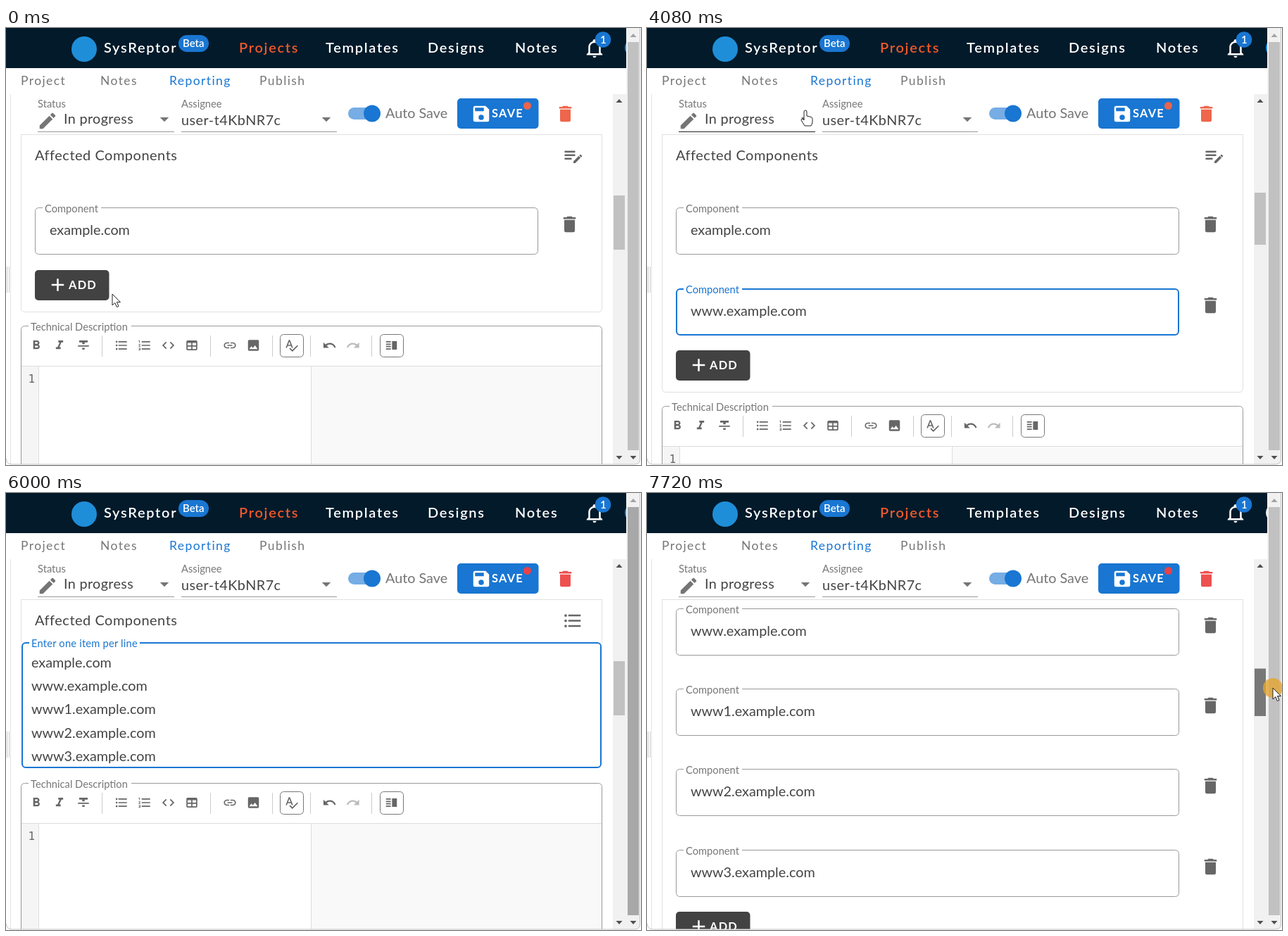
An HTML page that plays this animation: 902x621 px, repeating every 8000 ms.

```html
<!DOCTYPE html>
<html lang="en">
<head>
<meta charset="utf-8">
<title>Affected components</title>
<style>
html, body { margin: 0; width: 100%; height: 100%; overflow: hidden; background: #fff; }
svg { display: block; }
text { font-family: Lato, "Open Sans", sans-serif; white-space: pre; }
.body { font-size: 19.8px; fill: #444; }
.small { font-size: 14.7px; fill: #777; }
.title { font-size: 20px; letter-spacing: .5px; fill: #444; }
.tab { font-size: 17.5px; letter-spacing: 1.4px; fill: #777; }
.nav { font-size: 20px; font-weight: 600; letter-spacing: 1.7px; fill: #fff; }
.btn { font-size: 16.4px; font-weight: 700; letter-spacing: 1.25px; fill: #fff; }
.badge { font-size: 15px; font-weight: 600; fill: #fff; }
.num { font: 16px "DejaVu Sans Mono", monospace; fill: #666; }
.todo { font-size: 17.3px; fill: #fff; }
</style>
</head>
<body>
<svg id="stage" width="902" height="621" viewBox="0 0 902 621">
  <defs>
    <clipPath id="pane"><rect x="7" y="152" width="855" height="468"/></clipPath>
    <clipPath id="bar"><rect width="881" height="57"/></clipPath>
  </defs>
  <g id="content" clip-path="url(#pane)"></g>
  <g id="chrome"></g>
  <g id="live"></g>
</svg>
<script>
const BLUE = '#1976d2', GREY = '#999', LOOP = 8000, PITCH = 114.33;
const $ = id => document.getElementById(id);

const ICONS = {
  pencil: 'M20.71,7.04C21.1,6.65 21.1,6 20.71,5.63L18.37,3.29C18,2.9 17.35,2.9 16.96,3.29L15.12,5.12L18.87,8.87M3,17.25V21H6.75L17.81,9.93L14.06,6.18L3,17.25Z',
  down: 'M7,10L12,15L17,10H7Z',
  save: 'M15,9H5V5H15M12,19A3,3 0 0,1 9,16A3,3 0 0,1 12,13A3,3 0 0,1 15,16A3,3 0 0,1 12,19M17,3H5C3.89,3 3,3.9 3,5V19A2,2 0 0,0 5,21H19A2,2 0 0,0 21,19V7L17,3Z',
  trash: 'M19,4H15.5L14.5,3H9.5L8.5,4H5V6H19M6,19A2,2 0 0,0 8,21H16A2,2 0 0,0 18,19V7H6V19Z',
  bell: 'M10 21H14C14 22.1 13.1 23 12 23S10 22.1 10 21M21 19V20H3V19L5 17V11C5 7.9 7 5.2 10 4.3V4C10 2.9 10.9 2 12 2S14 2.9 14 4V4.3C17 5.2 19 7.9 19 11V17L21 19M17 11C17 8.2 14.8 6 12 6S7 8.2 7 11V18H17V11Z',
  plus: 'M19,13H13V19H11V13H5V11H11V5H13V11H19V13Z',
  edit: 'M2,6V8H14V6H2M2,10V12H14V10H2M20.04,10.13C19.9,10.13 19.76,10.19 19.65,10.3L18.65,11.3L20.7,13.35L21.7,12.35C21.92,12.14 21.92,11.79 21.7,11.58L20.42,10.3C20.31,10.19 20.18,10.13 20.04,10.13M18.07,11.88L12,17.94V20H14.06L20.12,13.93L18.07,11.88M2,14V16H10V14H2Z',
  list: 'M7,5H21V7H7V5M7,13V11H21V13H7M7,19V17H21V19H7' + [6, 12, 18].map(y => `M2.5,${y}a1.5,1.5 0 1,1 3,0a1.5,1.5 0 1,1 -3,0`).join(''),
  bold: 'M13.5,15.5H10V12.5H13.5A1.5,1.5 0 0,1 15,14A1.5,1.5 0 0,1 13.5,15.5M10,6.5H13A1.5,1.5 0 0,1 14.5,8A1.5,1.5 0 0,1 13,9.5H10M15.6,10.79C16.57,10.11 17.25,9 17.25,8C17.25,5.74 15.5,4 13.25,4H7V18H14.04C16.14,18 17.75,16.3 17.75,14.21C17.75,12.69 16.89,11.39 15.6,10.79Z',
  italic: 'M10,4V7H12.21L8.79,15H6V18H14V15H11.79L15.21,7H18V4H10Z',
  strike: 'M3,14H21V12H3M5,4V7H10V10H14V7H19V4M10,19H14V16H10V19Z',
  numbers: 'M7,13V11H21V13H7M7,19V17H21V19H7M7,7V5H21V7H7M3,8V5H2V4H4V8H3M2,17V16H5V20H2V19H4V18.5H3V17.5H4V17H2M4.25,10A0.75,0.75 0 0,1 5,10.75C5,10.95 4.92,11.14 4.79,11.27L3.12,13H5V14H2V13.08L4,11H2V10H4.25Z',
  code: 'M14.6,16.6L19.2,12L14.6,7.4L16,6L22,12L16,18L14.6,16.6M9.4,16.6L4.8,12L9.4,7.4L8,6L2,12L8,18L9.4,16.6Z',
  table: 'M5,4H19A2,2 0 0,1 21,6V18A2,2 0 0,1 19,20H5A2,2 0 0,1 3,18V6A2,2 0 0,1 5,4M5,8V12H11V8H5M13,8V12H19V8H13M5,14V18H11V14H5M13,14V18H19V14H13Z',
  link: 'M3.9,12C3.9,10.29 5.29,8.9 7,8.9H11V7H7A5,5 0 0,0 2,12A5,5 0 0,0 7,17H11V15.1H7C5.29,15.1 3.9,13.71 3.9,12M8,13H16V11H8V13M17,7H13V8.9H17C18.71,8.9 20.1,10.29 20.1,12C20.1,13.71 18.71,15.1 17,15.1H13V17H17A5,5 0 0,0 22,12A5,5 0 0,0 17,7Z',
  image: 'M8.5,13.5L11,16.5L14.5,12L19,18H5M21,19V5C21,3.89 20.1,3 19,3H5A2,2 0 0,0 3,5V19A2,2 0 0,0 5,21H19A2,2 0 0,0 21,19Z',
  spell: 'M21.59,11.59L13.5,19.68L9.83,16L8.42,17.41L13.5,22.5L23,13M6.43,11L8.5,5.5L10.57,11M12.45,16H14.54L9.43,3H7.57L2.46,16H4.55L5.67,13H11.31L12.45,16Z',
  undo: 'M12.5,8C9.85,8 7.45,9 5.6,10.6L2,7V16H11L7.38,12.38C8.77,11.22 10.54,10.5 12.5,10.5C16.04,10.5 19.05,12.81 20.1,16L22.47,15.22C21.08,11.03 17.15,8 12.5,8Z',
  redo: 'M11.5,8C14.15,8 16.55,9 18.4,10.6L22,7V16H13L16.62,12.38C15.23,11.22 13.46,10.5 11.5,10.5C7.96,10.5 4.95,12.81 3.9,16L1.53,15.22C2.92,11.03 6.85,8 11.5,8Z',
  split: 'M3 5H11V7H3ZM3 9H11V11H3ZM3 13H11V15H3ZM3 17H11V19H3ZM13 5H21V19H13Z'
};

// Drawing helpers
const icon = (name, cx, cy, fill = '#666', s = 1.25) =>
  `<path d="${ICONS[name]}" fill="${fill}" transform="translate(${cx - 12 * s} ${cy - 12 * s}) scale(${s})"/>`;
const text = (s, x, y, cls, fill) =>
  `<text x="${x}" y="${y}" class="${cls}"${fill ? ` style="fill:${fill}"` : ''}>${s}</text>`;
const rect = (x, y, w, h, fill, r = 0, extra = '') =>
  `<rect x="${x}" y="${y}" width="${w}" height="${h}" rx="${r}" fill="${fill}" ${extra}/>`;
const circle = (x, y, r, fill, extra = '') => `<circle cx="${x}" cy="${y}" r="${r}" fill="${fill}" ${extra}/>`;
const line = (d, stroke, w = 1) => `<path d="${d}" fill="none" stroke="${stroke}" stroke-width="${w}"/>`;

// Rounded border inside the box, with a gap in its top edge for the label
function notched(x, y, w, h, from, to, stroke, sw = 1) {
  const i = sw / 2, side = h - sw - 10;
  return line(`M${to} ${y + i}H${x + w - i - 5}a5 5 0 0 1 5 5v${side}a5 5 0 0 1-5 5H${x + i + 5}` +
    `a5 5 0 0 1-5-5v${-side}a5 5 0 0 1 5-5H${from}`, stroke, sw);
}

// Timing helpers
const pick = (steps, t) => steps.reduce((v, [at, next]) => t >= at ? next : v, steps[0][1]);
const within = (spans, t) => spans.some(([a, b]) => t >= a && t < b);
const ease = k => k * k * (3 - 2 * k);
function along(points, t) {
  const i = points.findIndex(p => p[0] > t);
  if (i < 0) return points[points.length - 1].slice(1);
  const a = points[i - 1], b = points[i], k = ease((t - a[0]) / (b[0] - a[0]));
  return a.slice(1).map((v, j) => v + (b[j + 1] - v) * k);
}

const MOUSE = [
  [0, 151, 378], [140, 151, 378], [420, 112, 370], [1240, 112, 374], [1600, 223, 404],
  [1800, 222, 410], [3720, 222, 410], [3920, 225, 117], [4160, 225, 117], [4560, 805, 182],
  [4720, 805, 182], [4960, 272, 315], [5860, 272, 315], [5980, 910, 250], [6100, 910, 250],
  [6400, 805, 182], [6600, 805, 182], [6880, 897, 252], [7040, 897, 252], [7160, 873, 252],
  [7240, 873, 252], [7700, 889, 277]
];
const POINTER = [
  [0, 'arrow'], [300, 'hand'], [780, 'beam'], [3020, ''], [3720, 'beam'], [3800, 'arrow'],
  [3880, 'hand'], [4240, 'arrow'], [4480, 'hand'], [4720, 'arrow'], [4840, 'beam'], [5300, ''],
  [5860, 'arrow'], [6360, 'hand'], [6640, 'arrow']
];
const CLICKS = [[560, 780], [1440, 1560], [1820, 2360], [4580, 4720], [5040, 5180], [6440, 6580], [7200, LOOP]];
const VIEW = [[0, 'one'], [780, 'two'], [4680, 'lines'], [6520, 'five']];
const SCROLL = [[0, 0], [7240, 0], [7700, 1]];
const HOSTS = ['', 'www.', 'www1.', 'www2.', 'www3.'].map(p => p + 'example.com');

function field(i, value, color, sw = 1) {
  const y = Math.round(255.3 + i * PITCH);
  return notched(41, y, 715, 67, 52, 135, color, sw) +
    text('Component', 55, y + 7, 'small', sw > 1 ? color : '') +
    value(y) + icon('trash', 800.5, y + 24);
}
const plain = s => y => text(s, 62, y + 39, 'body');
const todo = selected => y =>
  (selected ? rect(62, y + 19, 240, 27, '#d7d4f0') : '') +
  rect(62, y + 20, 57, 25, '#e53027', 3) + text('TODO', 66, y + 39, 'todo') +
  text('affected component', 124, y + 39, 'body');

function secondField(t) {
  if (t >= 5000) return field(1, plain(HOSTS[1]), GREY);
  const typed = Math.floor((t - 3020) / 45) + 1;
  const value = t < 3020 ? todo(t >= 2100) : plain(HOSTS[1].slice(0, typed));
  const color = pick([[0, GREY], [1240, '#333'], [1500, '#1d5faa'], [1800, BLUE]], t);
  const caret = within([[1600, 1800]], t) ? rect(222.3, 390, 1.2, 26, '#333') : '';
  return field(1, value, color, t >= 1500 ? 2 : 1) + caret;
}

const TOOLS = [['bold', 43], ['italic', 76], ['strike', 110], ['list', 164], ['numbers', 197], ['code', 230.5],
  ['table', 264], ['link', 318], ['image', 351.5], ['spell', 405.5], ['undo', 459.5], ['redo', 493], ['split', 547.5]];
function editor(y) {
  const body = y + 57.5;
  return rect(22, body, 24, 600, '#f5f5f5') + rect(434, body, 412, 600, '#f9f9f9') +
    line(`M22 ${body}H846M46.5 ${body}v600M433.5 ${body}v600`, '#ddd') +
    notched(21, y, 826, 700, 32, 178, GREY) +
    text('Technical Description', 35, y + 7, 'small') +
    line([136.5, 290.5, 378.5, 432.5, 519.5].map(x => `M${x} ${y + 14}v30`).join(''), '#ccc') +
    [389, 531].map(x => rect(x + .5, y + 12.5, 33, 32, 'none', 5, 'stroke="#777"')).join('') +
    TOOLS.map(([n, x]) => icon(n, x, y + 28, n === 'redo' ? '#bbb' : '#666', .86)).join('') +
    text('1', 31.5, y + 81, 'num');
}

function listView(t, count) {
  const extra = Math.round((count - 1) * PITCH);
  let s = line(`M21.5 100V${398.5 + extra}a5 5 0 0 0 5 5H841.5a5 5 0 0 0 5-5V100`, '#e0e0e0') +
    text('Affected Components', 41, 187.5, 'title') + icon('edit', 806, 182) +
    field(0, plain(HOSTS[0]), GREY);
  if (count > 1) s += secondField(t);
  for (let i = 2; i < count; i++) s += field(i, plain(HOSTS[i]), GREY);
  const add = 344 + extra;
  return s + rect(41, add, 105.5, 43, within([[300, 780]], t) ? '#525252' : '#424242', 5) +
    icon('plus', 73.5, add + 21, '#fff') + text('ADD', 89, add + 27, 'btn') + editor(423 + extra);
}

function linesView(t) {
  const pasted = t >= 5440, focus = t >= 5060;
  const color = focus ? BLUE : t >= 4840 ? '#333' : GREY;
  return line('M21.5 152V212M846.5 152V212', '#e0e0e0') +
    text('Affected Components', 41, 187.5, 'title') + icon('list', 805, 181.5) +
    notched(22, 212, 824, pasted ? 179 : 156, 33, 190, color, focus ? 2 : 1) +
    `<g letter-spacing=".2">${text('Enter one item per line', 36, 219, 'small', focus ? BLUE : '')}</g>` +
    HOSTS.slice(0, pasted ? 5 : 2).map((h, i) => text(h, 36, 247.5 + i * 33.35, 'body')).join('') +
    editor(pasted ? 412 : 388);
}

const POINTERS = {
  '': '',
  arrow: '<path d="M0 0V16l3.8-3.4 2.6 6 2.6-1.2-2.6-5.8h5Z" fill="#fff" stroke="#222"/>',
  beam: line('M-3.5-7.5H-1q1 0 1 1 0-1 1-1H3.5M0-6.5V6.5M-3.5 7.5H-1q1 0 1-1 0 1 1 1H3.5', '#222', 1.3),
  hand: '<path d="M-2 2a2 2 0 0 1 4 0V8l6 1.5q2 .5 2 3V16q0 3-2 6H-1L-6 14q0-2 2-2l2 2Z" fill="#fff" stroke="#222"/>'
};

const THUMB = { one: [238, 77], two: [234, 74], five: [224, 67.5] };
function live(t, view, drag) {
  const [x, y] = along(MOUSE, t);
  const [top, len] = THUMB[view] || (t < 5440 ? [240, 78] : [239, 77]);
  const warm = t < 4900;
  return rect(863, top + 25.5 * drag, 16, len, pick([[0, '#c1c1c1'], [7100, '#a8a8a8'], [7200, '#787878']], t)) +
    rect(883, 20, 16, 580, within([[5900, 7160]], t) ? '#a8a8a8' : '#c1c1c1') +
    line('M45 147.5H239', within([[3860, 4200]], t) ? '#222' : GREY) +
    circle(740.5, 110.5, 5.5, warm ? '#ea654c' : '#e8424a') +
    icon('trash', 794.5, 122, warm ? '#ee664b' : '#ee5050') +
    `<g clip-path="url(#bar)">${circle(891, 28, 12, t < 7300 ? '#2196f3' : '#e8eef2')}</g>` +
    (within(CLICKS, t) ? circle(x, y, 14, '#e3a52f', 'opacity=".8"') : '') +
    `<g transform="translate(${x.toFixed(1)} ${y.toFixed(1)})">${POINTERS[pick(POINTER, t)]}</g>`;
}

const triangle = (x, y, dir, fill) => `<path d="M${x - 4.5} ${y + 2 * dir}h9l-4.5 ${-5 * dir}Z" fill="${fill}"/>`;
$('chrome').innerHTML =
  rect(0, 0, 881, 57, '#021a2a') + circle(111, 30, 18, '#1f8ed8') +
  text('SysReptor', 139, 35, 'nav') + rect(245, 10, 43, 24, BLUE, 12) + text('Beta', 251, 27, 'badge') +
  [['Projects', 331, '#f0592a'], ['Templates', 454], ['Designs', 599], ['Notes', 723]]
    .map(([s, x, c]) => text(s, x, 35, 'nav', c)).join('') +
  icon('bell', 836, 28.5, '#fff') + circle(848, 16.5, 11.3, BLUE) + text('1', 844, 21.5, 'badge') +
  [['Project', 21], ['Notes', 134], ['Reporting', 232, BLUE], ['Publish', 360]]
    .map(([s, x, c]) => text(s, x, 81, 'tab', c)).join('') +
  text('Status', 45, 112.5, 'small') + icon('pencil', 59, 132, '#757575') +
  `<g letter-spacing=".35">${text('In progress', 82, 136, 'body')}</g>` + icon('down', 225, 129.5, '#757575') +
  text('Assignee', 249, 112.5, 'small') +
  `<g letter-spacing=".5">${text('user-t4KbNR7c', 249, 138, 'body')}</g>` + icon('down', 455, 129.5, '#757575') +
  line('M249 147.5H470', GREY) +
  rect(486, 113, 40, 17, '#75ade4', 8.5) + circle(520, 121.5, 12, BLUE) +
  text('Auto Save', 539, 128, 'body', '#757575') +
  rect(641, 100, 115.5, 43, BLUE, 5) + icon('save', 675, 122, '#fff') + text('SAVE', 690, 126.5, 'btn') +
  line('M21 151.5H847', '#e0e0e0') + line('M6.5 94V620', '#e4e4e4') + line('M1.5 339V376M4.5 339V376', '#c8c8c8') +
  rect(862, 94, 19, 526, '#f1f1f1') + rect(881, 0, 20, 620, '#f1f1f1') +
  triangle(871, 104, 1, '#505050') + triangle(871, 610, -1, '#505050') +
  triangle(891, 11, 1, '#a3a3a3') + triangle(891, 610, -1, '#505050') +
  '<path d="M0 612q0 9 9 9H0ZM902 612q0 9-9 9H902Z" fill="#fff"/>' +
  line('M.5 612q0 8 8 8H892.5q8 0 8-8V0', '#c4c4c4');

const shown = {};
function put(id, html) {
  if (shown[id] !== html) $(id).innerHTML = shown[id] = html;
}

function draw(now) {
  const t = Math.floor((now % LOOP) / 20) * 20;
  const view = pick(VIEW, t), [drag] = along(SCROLL, t);
  const page = view === 'lines' ? linesView(t) : listView(t, { one: 1, two: 2, five: 5 }[view]);
  put('content', `<g transform="translate(0 ${Math.round(-206 * drag)})">${page}</g>`);
  put('live', live(t, view, drag));
  requestAnimationFrame(() => draw(performance.now()));
}
draw(performance.now());
</script>
</body>
</html>
```
